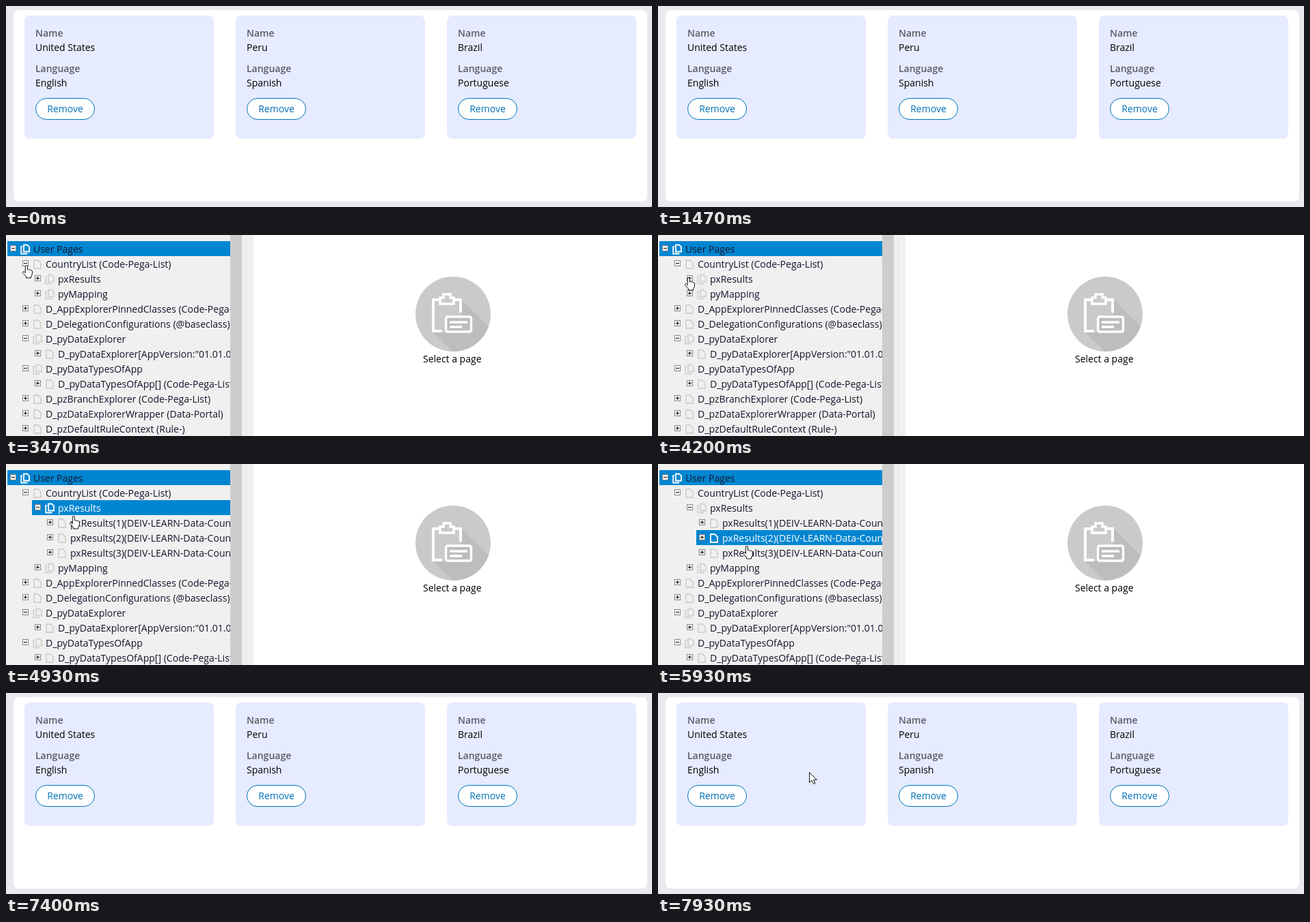
Animation of 945 by 295 pixels, one loop 8000 ms. Source, as an HTML page:

```html
<!DOCTYPE html>
<html lang="en">
<head>
<meta charset="utf-8">
<title>Country list and page tree</title>
<style>
  html, body { margin: 0; width: 100%; height: 100%; overflow: hidden; }
  body { position: relative; background: #e9eaee; color: #000; font: 14px/20px "Open Sans", sans-serif; }
  svg { position: absolute; overflow: visible; }

  /* every part shares one 8 s clock; changes land a hair early */
  .tree-view, .kids, .opens i, .hot, .focus, .cursor {
    animation: 8s step-end -4ms infinite;
  }

  /* country cards */
  .panel { position: absolute; left: 11px; top: 6px; width: 927px; height: 281px; border-radius: 8px; background: #fff; }
  .card { position: absolute; top: 8px; width: 277px; height: 181px; border-radius: 8px; background: #e6ebff; }
  .card > * { position: absolute; left: 16px; white-space: nowrap; }
  .card b { font-weight: 600; color: #585c66; }
  .button {
    top: 121px; width: 87px; height: 32px; box-sizing: border-box; border: 1px solid #0076bd; border-radius: 16px;
    background: #fff; color: #0070b8; line-height: 30px; text-align: center;
  }

  /* page tree */
  .tree-view { position: absolute; inset: 0; background: #fff; opacity: 0; animation-name: view; }
  .tree { position: absolute; left: 0; top: 0; width: 328px; height: 295px; padding-top: 9px; box-sizing: border-box; overflow: hidden; background: #f0f0f0; }
  .bar { position: absolute; top: 0; height: 100%; }
  .row {
    --bg: transparent; --ink: #14142b; --line: #d2d2d2;
    position: relative; height: 22px; margin-left: calc(2px + 18px * var(--depth));
    background: var(--bg); color: var(--ink); line-height: 22px; white-space: nowrap;
  }
  .row span { position: absolute; left: 38px; top: 1px; }
  .row svg { left: 19px; top: 4px; width: 14px; height: 16px; fill: none; stroke: var(--line); stroke-width: 1.8; }
  .root { --bg: #0086d1; --line: #fff; }
  .box { position: absolute; left: 4px; top: 6px; width: 7px; height: 7px; border: 1px solid #858585; background: #fff; }
  .box::before, .box i { content: ""; position: absolute; background: #000; }
  .box::before { left: 1px; top: 3px; width: 5px; height: 1px; }
  .box i { left: 3px; top: 1px; width: 1px; height: 5px; }
  .focus { position: absolute; left: 5px; top: 10px; width: 10px; height: 18px; border: 1px dotted #14142b; animation-name: focus; }
  .kids { height: 0; overflow: hidden; }
  .list { animation-name: open-list; }
  .results { animation-name: open-results; }
  .opens-list i { animation-name: mark-list; }
  .opens-results i { animation-name: mark-results; }
  .hot0 { animation-name: hot0; }
  .hot1 { animation-name: hot1; }
  .hot2 { animation-name: hot2; }
  .hot3 { animation-name: hot3; }
  .hint { position: absolute; left: 610px; top: 172px; white-space: nowrap; }

  .cursor { left: 0; top: 0; width: 15px; height: 20px; fill: #fff; stroke: #111; stroke-linejoin: round; }
  .arrow { animation-name: arrow; }
  .hand { animation-name: hand; }

  @keyframes view { 0% { opacity: 0 } 26.625% { opacity: 1 } 92.5%, 100% { opacity: 0 } }
  @keyframes focus { 0% { opacity: 1 } 41.625%, 100% { opacity: 0 } }
  @keyframes open-list { 0% { height: 0 } 43.375%, 100% { height: auto } }
  @keyframes open-results { 0% { height: 0 } 56.625%, 100% { height: 66px } }
  @keyframes mark-list { 0% { opacity: 1 } 43.375%, 100% { opacity: 0 } }
  @keyframes mark-results { 0% { opacity: 1 } 56.625%, 100% { opacity: 0 } }

  @keyframes hot0 {
    0%, 62.5%, 100% { --bg: transparent; --ink: #14142b; --line: #d2d2d2 }
    60% { --bg: #0086d1; --ink: #fff; --line: #fff }
  }
  @keyframes hot1 {
    0%, 70.875%, 100% { --bg: transparent; --ink: #14142b; --line: #d2d2d2 }
    62.5% { --bg: #0086d1; --ink: #fff; --line: #fff }
  }
  @keyframes hot2 {
    0%, 75%, 82.5%, 100% { --bg: transparent; --ink: #14142b; --line: #d2d2d2 }
    70.875%, 80.875% { --bg: #0086d1; --ink: #fff; --line: #fff }
  }
  @keyframes hot3 {
    0%, 80.875%, 100% { --bg: transparent; --ink: #14142b; --line: #d2d2d2 }
    75% { --bg: #0086d1; --ink: #fff; --line: #fff }
  }

  @keyframes arrow {
    0% { transform: translate(944px, 294px) }
    8.25% { transform: translate(944px, 294px); animation-timing-function: steps(11) }
    17.5% { transform: translate(38px, 84px) }
    18.375% { transform: translate(-50px, 64px) }
    97.5% { transform: translate(34px, 84px) }
    98.375% { transform: translate(126px, 100px) }
    99.125%, 100% { transform: translate(221px, 116px) }
  }
  @keyframes hand {
    0% { transform: translate(-50px, 54px) }
    35.875% { transform: translate(5px, 54px); animation-timing-function: steps(7) }
    41.625% { transform: translate(24px, 44px) }
    46.625% { transform: translate(22px, 46px); animation-timing-function: steps(7) }
    52.5% { transform: translate(39px, 62px) }
    59.125% { transform: translate(39px, 62px); animation-timing-function: steps(3) }
    61.625% { transform: translate(93px, 76px); animation-timing-function: steps(4) }
    65% { transform: translate(110px, 86px) }
    67.5% { transform: translate(110px, 86px); animation-timing-function: steps(8) }
    74.125% { transform: translate(124px, 120px); animation-timing-function: steps(3) }
    76.625% { transform: translate(128px, 128px) }
    78.25% { transform: translate(128px, 128px); animation-timing-function: steps(7) }
    84.25% { transform: translate(5px, 89px) }
    85%, 100% { transform: translate(-50px, 89px) }
  }
</style>
</head>
<body>
  <div class="panel" id="cards"></div>
  <div class="tree-view">
    <div class="tree" id="tree"></div>
    <div class="focus"></div>
    <div class="bar" style="left:328px;width:17px;background:#cdcdcd"></div>
    <div class="bar" style="left:345px;width:17px;background:#f0f0f0"></div>
    <div class="bar" style="left:351px;width:1px;background:#e4e4e4"></div>
    <svg style="left:599px;top:61px" width="110" height="110" viewBox="599 61 110 110">
      <clipPath id="disc"><circle cx="654" cy="116" r="55"/></clipPath>
      <circle cx="654" cy="116" r="55" fill="#cacaca"/>
      <path d="M666 94l60 60v30h-60l-41-41h16v-24h25z" fill="#bdbdbd" clip-path="url(#disc)"/>
      <g fill="none" stroke="#fff" stroke-width="4">
        <path d="M635 95H625V141H638M655 95H665V114"/>
        <path d="M635 101V92H640V87H650V92H655V101Z" stroke-width="3.5"/>
        <rect x="643.5" y="120" width="37" height="22" rx="2.5" stroke-width="3.5"/>
        <path d="M649 128H675M649 135H667" stroke-width="3.5"/>
      </g>
    </svg>
    <div class="hint">Select a page</div>
  </div>
  <svg class="cursor arrow"><path d="M.5 .5V15.5L4 12.2 6.5 17.5 9 16.5 6.6 11.3H11.3Z"/></svg>
  <svg class="cursor hand"><path d="M4.3 11.5V2a1.5 1.5 0 0 1 3 0v5a1.4 1.4 0 0 1 2.4.5 1.4 1.4 0 0 1 2.4.6 1.3 1.3 0 0 1 2.3 1V13.5L12.5 17V19H5.5V17L.7 11.5C0 10 1.5 8.8 2.7 10Z"/></svg>

<script>
  const countries = [["United States", "English"], ["Peru", "Spanish"], ["Brazil", "Portuguese"]];
  const line = (tag, top, text) => `<${tag} style="top:${top}px">${text}</${tag}>`;

  document.getElementById("cards").innerHTML = countries.map(([name, language], i) =>
    `<div class="card" style="left:${16 + 309 * i}px">` +
    line("b", 16, "Name") + line("span", 37, name) +
    line("b", 68, "Language") + line("span", 89, language) +
    `<div class="button">Remove</div></div>`).join("");

  const icons = {
    page: "M2 2h6l4 4v8H2z",
    pages: "M5 1.5h5l3 3V11.5H5zM3 4H1.2v10.5H9.5V13.5"
  };

  const row = (depth, icon, text, open = false, cls = "") =>
    `<div class="row ${cls}" style="--depth:${depth}">` +
    `<div class="box">${open ? "" : "<i></i>"}</div>` +
    `<svg><path d="${icons[icon]}"/></svg><span>${text}</span></div>`;
  const leaf = text => row(1, "page", text);

  const results = [1, 2, 3].map(n =>
    row(3, "page", `pxResults(${n})(DEIV-LEARN-Data-Country)`, false, `hot hot${n}`)).join("");

  document.getElementById("tree").innerHTML = [
    row(0, "pages", "User Pages", true, "root"),
    row(1, "page", "CountryList (Code-Pega-List)", false, "opens opens-list"),
    `<div class="kids list">`,
    row(2, "pages", "pxResults", false, "opens opens-results hot hot0"),
    `<div class="kids results">${results}</div>`,
    row(2, "pages", "pyMapping"),
    `</div>`,
    leaf("D_AppExplorerPinnedClasses (Code-Pega-List)"),
    leaf("D_DelegationConfigurations (@baseclass)"),
    row(1, "pages", "D_pyDataExplorer", true),
    row(2, "page", `D_pyDataExplorer[AppVersion:"01.01.01"]`),
    row(1, "pages", "D_pyDataTypesOfApp", true),
    row(2, "page", "D_pyDataTypesOfApp[] (Code-Pega-List)"),
    leaf("D_pzBranchExplorer (Code-Pega-List)"),
    leaf("D_pzDataExplorerWrapper (Data-Portal)"),
    leaf("D_pzDefaultRuleContext (Rule-)"),
    leaf("D_pzEditConfigurations (Data-Portal)"),
    leaf("D_pzGetRecordManagementPreferences (Code-Pega-List)")
  ].join("");
</script>
</body>
</html>
```
